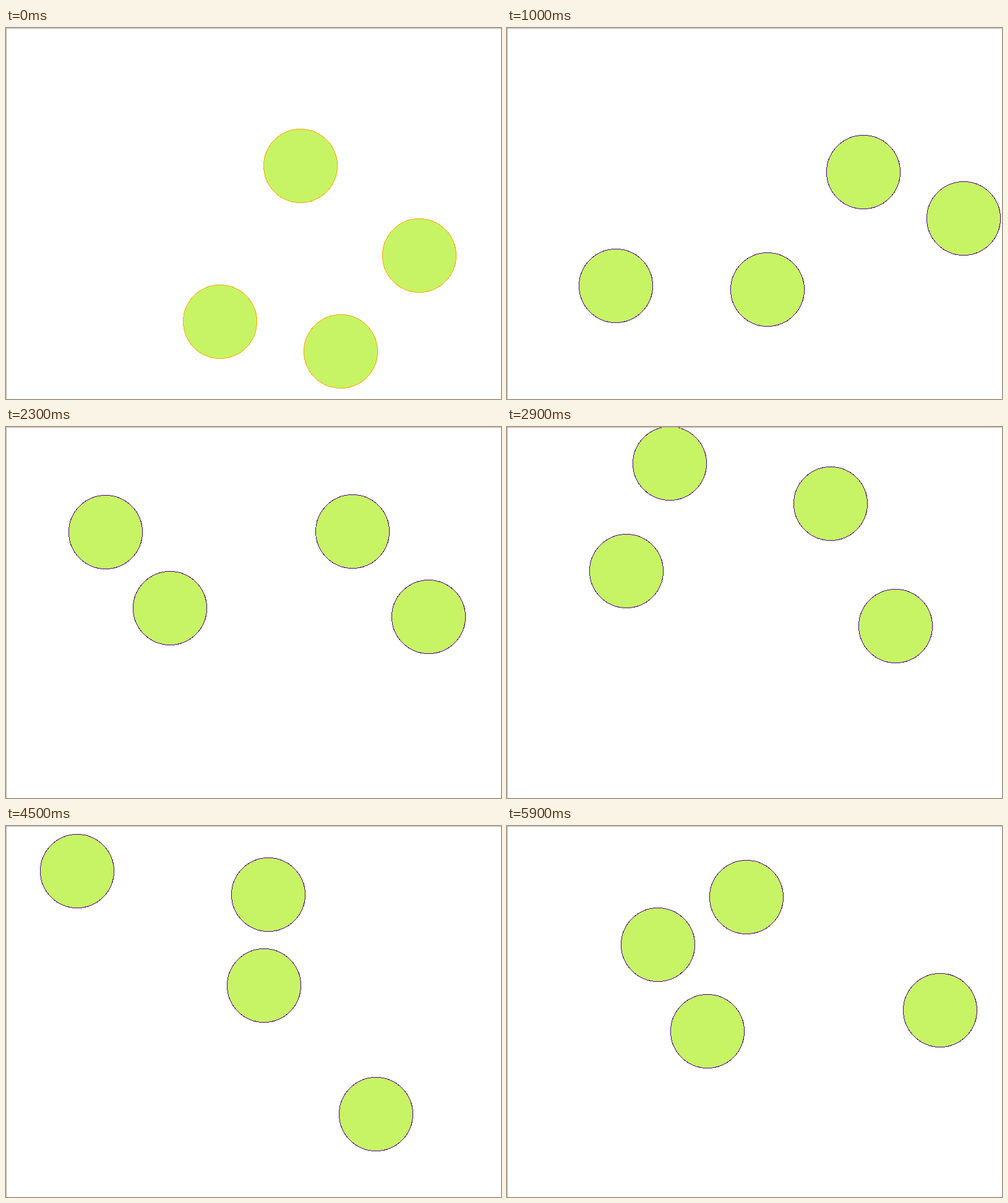
Write an HTML page that moves like this. It is 800 by 600 pixels and loops after 6 s.

```html
<!DOCTYPE html>
<html lang="en">
<head>
<meta charset="utf-8">
<title>Bouncing balls</title>
<style>
  html, body { margin: 0; width: 100%; height: 100%; overflow: hidden; background: #fff; }
  svg { display: block; }
  circle { fill: #c7f464; stroke-width: 1; }
</style>
</head>
<body>
<svg width="800" height="600" viewBox="0 0 800 600" shape-rendering="crispEdges">
  <g id="balls"></g>
  <path d="M0 0H800V1H1V600H0Z" fill="#b0b0b0"/>
</svg>
<script>
const TICK = 100, TICKS = 60, SUBSTEPS = 100;
const WALLS = { left: 58, top: 57.5, right: 744.5, bottom: 541 };
const CONTACT = 117;                 // centre distance at which two balls collide
const FACET = 2 * Math.PI / 26;      // balls collide as 26-sided polygons

const balls = [
  { x: 476, y: 223, vx: 10, vy: 1 },
  { x: 668, y: 368, vx: 7, vy: -6 },
  { x: 346, y: 475, vx: -17, vy: 19 },
  { x: 541, y: 523, vx: -12, vy: -10 }
];

function bounce(ball) {
  if (ball.x < WALLS.left) ball.vx = Math.abs(ball.vx);
  if (ball.x > WALLS.right) ball.vx = -Math.abs(ball.vx);
  if (ball.y < WALLS.top) ball.vy = Math.abs(ball.vy);
  if (ball.y > WALLS.bottom) ball.vy = -Math.abs(ball.vy);
}

// Elastic collision of equal masses along the nearest facet normal
function collide(a, b) {
  const dx = b.x - a.x, dy = b.y - a.y;
  if (Math.hypot(dx, dy) > CONTACT) return;
  const angle = Math.round(Math.atan2(dy, dx) / FACET) * FACET;
  const nx = Math.cos(angle), ny = Math.sin(angle);
  const closing = (a.vx - b.vx) * nx + (a.vy - b.vy) * ny;
  if (closing <= 0) return;
  a.vx -= closing * nx;
  a.vy -= closing * ny;
  b.vx += closing * nx;
  b.vy += closing * ny;
}

function advance() {
  for (let step = 0; step < SUBSTEPS; step++) {
    for (const ball of balls) {
      ball.x += ball.vx / SUBSTEPS;
      ball.y += ball.vy / SUBSTEPS;
      bounce(ball);
    }
    balls.forEach((a, i) => balls.slice(i + 1).forEach(b => collide(a, b)));
  }
}

const states = Array.from({ length: TICKS }, (_, tick) => {
  if (tick) advance();
  return balls.map(({ x, y }) => [Math.round(x), Math.round(y)]);
});

const group = document.getElementById('balls');
const circles = balls.map(() => {
  const circle = document.createElementNS('http://www.w3.org/2000/svg', 'circle');
  circle.setAttribute('r', 59.5);
  return group.appendChild(circle);
});

function draw(time) {
  const tick = Math.floor(time / TICK) % TICKS;
  group.setAttribute('stroke', tick ? '#4b0082' : '#ffa500');
  circles.forEach((circle, i) => {
    const [x, y] = states[tick][i];
    circle.setAttribute('cx', x);
    circle.setAttribute('cy', y);
  });
}

const start = performance.now();
function loop() {
  draw(performance.now() - start);
  requestAnimationFrame(loop);
}
loop();
</script>
</body>
</html>
```
